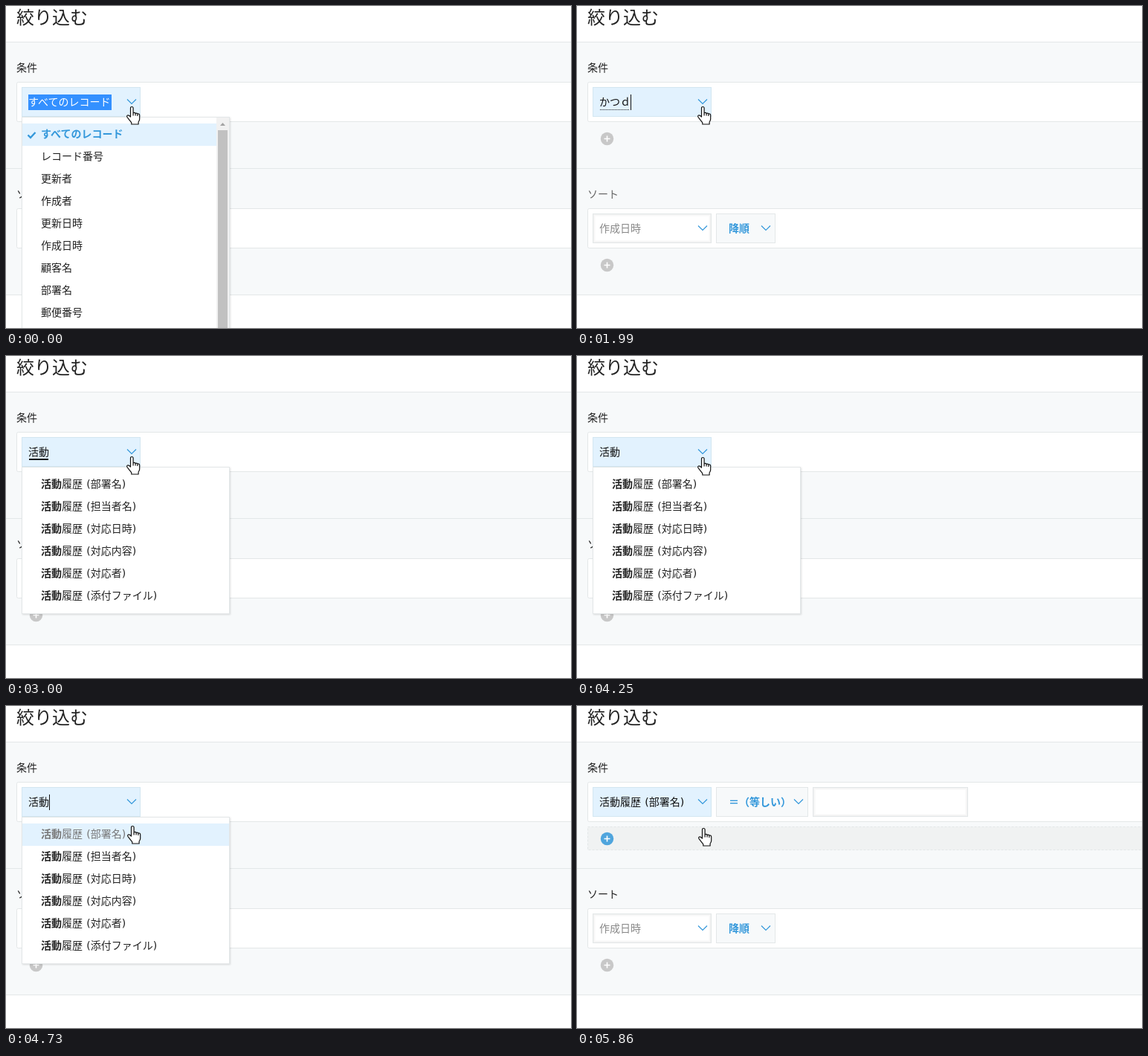
An HTML page for the animation above (6410 ms loop, 760 by 433 pixels).

```html
<!DOCTYPE html>
<html lang="ja">
<head>
<meta charset="utf-8">
<title>絞り込む</title>
<style>
  html, body { margin: 0; height: 100%; overflow: hidden; background: #fff; }
  svg { display: block; width: 100%; height: 100%; }
  text { font: 14px "DejaVu Sans", "Noto Sans CJK JP", sans-serif; fill: #222; word-spacing: .8px; }
  text, .cjk { font-family: "DejaVu Sans", "Noto Sans CJK JP", sans-serif; }
  .cjk { font-family: "Noto Sans CJK JP", sans-serif; }
  .title { font-size: 24px; font-weight: 300; }
  .bold { font-weight: bold; }
  .blue { fill: #3498db; }
  .gray { fill: #888; }
  .edge { stroke: #e3e7e8; }
  .line { fill: none; stroke: #3498db; }
  .menu { filter: drop-shadow(1px 1px 1px rgba(0, 0, 0, .12)); }
</style>
</head>
<body>
<svg id="stage" viewBox="0 0 760 433"></svg>
<script>
const LOOP = 6410;
const fields = ['レコード番号', '更新者', '作成者', '更新日時', '作成日時', '顧客名', '部署名', '郵便番号'];
const matches = ['部署名', '担当者名', '対応日時', '対応内容', '対応者', '添付ファイル'];
const typing = [
  [0, 'すべてのレコード'], [1130, 'ｋ'], [1260, 'か'], [1390, 'かｔ'], [1660, 'かつ'], [1990, 'かつｄ'],
  [2120, 'かつど'], [2250, 'かつどう'], [2450, '活動'], [5330, '活動履歴 (部署名)']
];
const carets = [[1130, 3000], [3330, 3860], [4390, 4870], [5330, 5860]];

const box = (x, y, w, h, fill, extra = '') =>
  `<rect x="${x + .5}" y="${y + .5}" width="${w - 1}" height="${h - 1}" fill="${fill}" class="edge" ${extra}/>`;
const flat = (x, y, w, h, fill, extra = '') =>
  `<rect x="${x}" y="${y}" width="${w}" height="${h}" fill="${fill}" ${extra}/>`;
const label = (x, y, str, cls = '', extra = '') => `<text x="${x}" y="${y}" class="${cls}" ${extra}>${str}</text>`;
const chevron = (x, y) => `<path class="line" stroke-width="1.2" d="M${x - 6} ${y - 3}l6 6 6-6"/>`;
const plus = (y, id) => `<circle id="${id}" cx="40.5" cy="${y}" r="8.7" fill="#c8c8c8"/>
  <path d="M36.5 ${y}h8m-4-4v8" stroke="#fff" stroke-width="1.6"/>`;
const inset = (x, y, w, h) => box(x, y, w, h, '#fff') +
  [['#f2f2f2', 1], ['#f7f7f7', 2], ['#fbfbfb', 3]].map(([c, d]) =>
    `<rect x="${x + d + .5}" y="${y + d + .5}" width="${w - 2 * d - 1}" height="${h - 2 * d - 1}" fill="none" stroke="${c}"/>`).join('');
const row = i => 177 + 30 * i;

stage.innerHTML = `
  ${flat(0, 48, 760, 341, '#f7f9fa')}
  ${[48, 218, 388].map(y => flat(0, y, 760, 1, '#e3e7e8')).join('')}
  ${label(14, 24, '絞り込む', 'cjk title')}
  ${label(14, 88, '条件')}
  ${label(14, 258, 'ソート', '', 'id="sortLabel"')}
  ${box(14, 102, 770, 54, '#fff', 'rx="2"')}
  ${box(14, 272, 770, 54, '#fff', 'rx="2"')}
  <g id="result">
    ${box(14, 162, 770, 32, '#f0f2f2', 'stroke-dasharray="3 2"')}
    ${box(187, 109, 124, 40, '#f7f9fa')}
    ${label(204, 134, '＝（等しい）', 'cjk bold blue')}
    ${chevron(298, 128.5)}
    ${inset(317, 109, 209, 40)}
  </g>
  ${plus(178.5, 'addCondition')}
  ${inset(21, 279, 160, 40)}
  ${label(30, 304, '作成日時', 'gray')}
  ${chevron(169, 298.5)}
  ${box(187, 279, 80, 40, '#f7f9fa')}
  ${label(204, 304, '降順', 'bold blue')}
  ${chevron(254, 298.5)}
  ${plus(348.5, 'addSort')}

  ${box(21, 109, 160, 40, '#e2f2fe', 'style="stroke:#d3e6f1"')}
  ${flat(30, 119, 112, 21, '#3390ff', 'id="selection"')}
  ${label(30, 134, '', '', 'id="input"')}
  <path id="dots" stroke="#222" stroke-dasharray="1 1"/>
  ${flat(31, 138, 26, 2, '#111', 'id="underline"')}
  ${flat(0, 119, 1, 21, '#000', 'id="caret"')}
  ${chevron(169, 128.5)}

  <g id="fullMenu">
    <g class="menu">${box(21, 149, 280, 300, '#fff')}</g>
    ${flat(22, 158, 262, 30, '#e2f2fe')}
    <path class="line" stroke-width="2.4" d="M29.5 173.5l3.5 3.5 6.5-7"/>
    ${label(47, 177, 'すべてのレコード', 'bold blue')}
    ${fields.map((f, i) => label(47, row(i + 1), f)).join('')}
    ${flat(283, 150, 17, 283, '#f1f1f1')}
    ${flat(285, 167, 13, 266, '#c1c1c1')}
    <path d="M288 161l3.5-4 3.5 4z" fill="#a3a3a3"/>
  </g>
  <g id="matchMenu">
    <g class="menu">${box(21, 149, 280, 198, '#fff')}</g>
    ${flat(22, 158, 278, 30, '#e2f2fe', 'id="hover"')}
    ${matches.map((m, i) => label(47, row(i), `<tspan class="bold">活動</tspan>履歴 (${m})`, '', `id="match${i}"`)).join('')}
  </g>
  <circle id="click" cx="169.5" cy="164.5" r="12.3" fill="#f7ee20" fill-opacity=".8"/>
  <path id="hand" fill="#fff" stroke="#111" stroke-width="1.2" stroke-linejoin="round"
    d="M5.5 14V2.5q0-2 1.8-2t1.8 2V9q1.6-1.4 3 .4 1.6-1 2.8.6 2.8-.4 2.8 2v5q0 2-1.6 4v3H6.8v-2.2L1.3 14.8q-1.4-2 .2-2.8 1.6-.4 4 2zM9.1 9v3.5m3-3v3m2.8-2.5v3"/>`;

const $ = id => document.getElementById(id);
const show = (id, on) => $(id).setAttribute('visibility', on ? 'visible' : 'hidden');
const set = (id, attrs) => Object.entries(attrs).forEach(([k, v]) => $(id).setAttribute(k, v));

function draw(t) {
  const within = (a, b) => t >= a && t < b;
  const text = typing.filter(([at]) => t >= at).pop()[1];
  const done = t >= 5330;
  const end = done ? 145 : 30 + 14 * text.length;
  const ink = within(1130, 1260) ? '#777' : '#111';

  $('input').textContent = text;
  $('input').style.fill = t < 1130 ? '#fff' : ink;
  show('selection', t < 1130);
  show('fullMenu', t < 1130);
  show('dots', within(1130, 2450));
  set('dots', { d: `M31 139.5H${end - 1}` });
  show('underline', within(2450, 3330));
  show('caret', carets.some(([a, b]) => within(a, b)));
  set('caret', { x: end, fill: ink });

  // The pointer advances in ten discrete steps.
  const step = Math.min(10, Math.max(0, Math.floor((t - 4250) / 68.5) + 1)) / 10;
  const ease = step * step * (3 - 2 * step);
  set('hand', { transform: `translate(${162 + Math.round(ease)} ${135 + Math.round(29 * ease)})` });

  const hovering = within(4730, 5330);
  show('matchMenu', within(2450, 5330));
  show('hover', hovering);
  $('match0').style.fill = hovering ? '#777' : '#222';
  show('click', within(5270, 5330));
  show('result', done);
  set('addCondition', { fill: done ? '#4fa5dd' : '#c8c8c8' });
  $('sortLabel').style.fill = within(1130, 2450) ? '#666' : '#222';
}

const start = performance.now();
function tick() {
  draw((performance.now() - start) % LOOP);
  requestAnimationFrame(tick);
}
tick();
</script>
</body>
</html>
```
